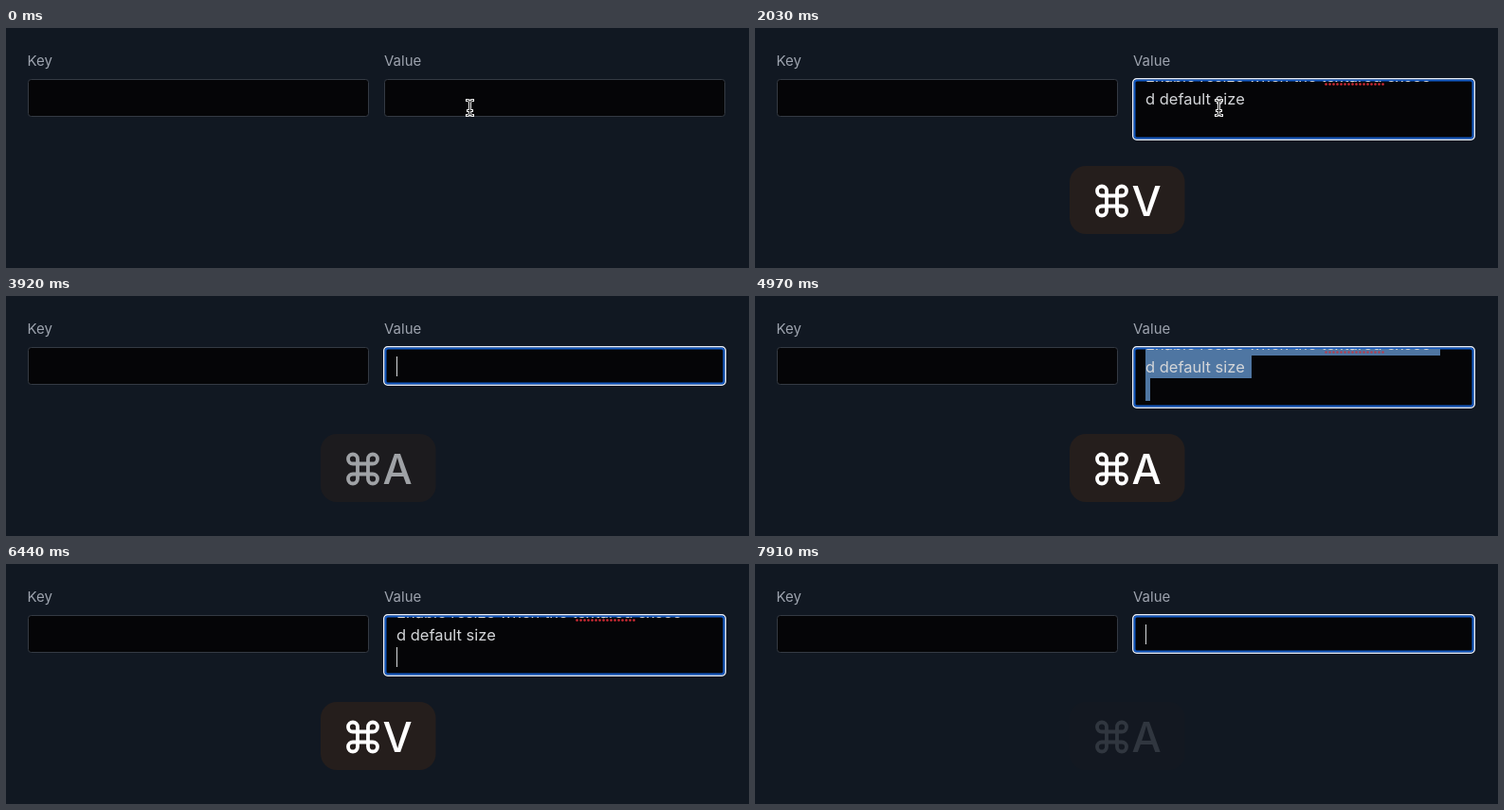
An HTML page that plays this animation: 784x254 px, repeating every 8050 ms.

```html
<!DOCTYPE html>
<html lang="en">
<head>
<meta charset="utf-8">
<title>Growing text field</title>
<style>
  html, body { margin: 0; width: 100%; height: 100%; overflow: hidden; background: #111822; }
  svg { display: block; width: 784px; height: 254px; font-family: Inter, sans-serif; }
  .label { font-size: 15px; fill: #9da3ae; }
  .text { font-size: 16.5px; fill: #d3d5d8; }
  .field { fill: #050507; stroke: #343a43; }
</style>
</head>
<body>
<svg viewBox="0 0 784 254">
  <defs>
    <clipPath id="inside"><rect x="402" y="56" width="355" height="60"/></clipPath>
  </defs>
  <rect width="784" height="254" fill="#111822"/>
  <text class="label" x="22.5" y="40">Key</text>
  <text class="label" x="399" y="40">Value</text>
  <rect class="field" x="23.5" y="54.5" width="359" height="39" rx="3"/>
  <rect class="field" id="value" x="399.5" y="54.5" width="359" height="39" rx="3"/>

  <g id="ring" fill="none">
    <rect class="edge" x="398.75" y="53.75" width="360.5" rx="4" stroke="#e9eef7" stroke-width="1.5"/>
    <rect class="edge" x="400.5" y="55.5" width="357" rx="2.5" stroke="#1157c0" stroke-width="2"/>
  </g>

  <g clip-path="url(#inside)">
    <path id="selection" fill="#4f76a2" d="M412 39H723V63H524V87H417V111H412Z"/>
    <g id="content">
      <text class="text" x="412" y="57">Enable resize when the textared excee</text>
      <text class="text" x="412" y="81">d default size</text>
      <path id="squiggle" d="M602.5 59.5H664" stroke="#d52c35" stroke-width="2.6" stroke-linecap="round" stroke-dasharray="0.1 3.9"/>
    </g>
    <rect id="caret" x="412" width="1" height="21" fill="#d8dadd"/>
  </g>

  <g id="pointer" fill="none" stroke-linecap="square">
    <path id="beam" d="M486.5 76.5Q489.5 76.5 489.5 79V90Q489.5 92.5 486.5 92.5M492.5 76.5Q489.5 76.5 489.5 79M492.5 92.5Q489.5 92.5 489.5 90M487.5 87.5H491.5" stroke="#f4f4f4" stroke-width="3"/>
    <use href="#beam" id="core"/>
    <path d="M486.5 76.5Q489.5 76.5 489.5 79V90Q489.5 92.5 486.5 92.5M492.5 76.5Q489.5 76.5 489.5 79M492.5 92.5Q489.5 92.5 489.5 90M487.5 87.5H491.5" stroke="#111" stroke-width="1"/>
  </g>

  <g id="badge">
    <rect x="332" y="146" width="121.5" height="72" rx="17" fill="#251e1c"/>
    <path d="M371 178V172.5A5 5 0 1 0 366 177.5H387A5 5 0 1 0 382 172.5V193.5A5 5 0 1 0 387 188.5H366A5 5 0 1 0 371 193.5Z" fill="none" stroke="#fff" stroke-width="3.8"/>
    <text id="letter" x="413" y="199" text-anchor="middle" font-size="44" font-weight="500" fill="#fff"></text>
  </g>
</svg>
<script>
const LOOP = 8050, BLINK = 600, HOLD = 1000, FADE = 300;

// [start time, field state]
const states = [
  [0, "blurred"], [420, "empty"], [1330, "filled"], [2800, "selected"],
  [3850, "empty"], [4200, "filled"], [4760, "selected"],
  [5880, "empty"], [6300, "filled"], [6650, "selected"], [7450, "empty"]
];
// [press time, key held with Command]
const shortcuts = [[1260, "V"], [2800, "A"], [4200, "V"], [4760, "A"], [6300, "V"], [6650, "A"]];

const $ = id => document.getElementById(id);
const edges = document.querySelectorAll(".edge");
const latest = (list, t) => list.filter(([start]) => start <= t).pop();
const show = (id, visible) => $(id).setAttribute("visibility", visible ? "visible" : "hidden");

$("core").remove();

function draw(t) {
  const [start, state] = latest(states, t);
  const focused = state !== "blurred";
  const selected = state === "selected";
  const tall = selected || state === "filled";
  const height = tall ? 63 : 39;

  $("value").setAttribute("height", height);
  edges[0].setAttribute("height", height + 1.5);
  edges[1].setAttribute("height", height - 2);
  show("ring", focused);
  show("content", tall);
  show("selection", selected);
  $("squiggle").setAttribute("opacity", selected ? 0.7 : 1);
  $("caret").setAttribute("y", tall ? 88 : 64);
  show("caret", focused && !selected && Math.floor((t - start) / BLINK) % 2 === 0);
  show("pointer", t < 2800);

  const [pressed, key] = latest(shortcuts, t) || [-LOOP, ""];
  const fade = (t - pressed - HOLD) / FADE;
  $("letter").textContent = key;
  $("badge").setAttribute("opacity", Math.max(0, Math.min(1, 1 - fade)));
}

function tick() {
  draw(performance.now() % LOOP);
  requestAnimationFrame(tick);
}
tick();
</script>
</body>
</html>
```
